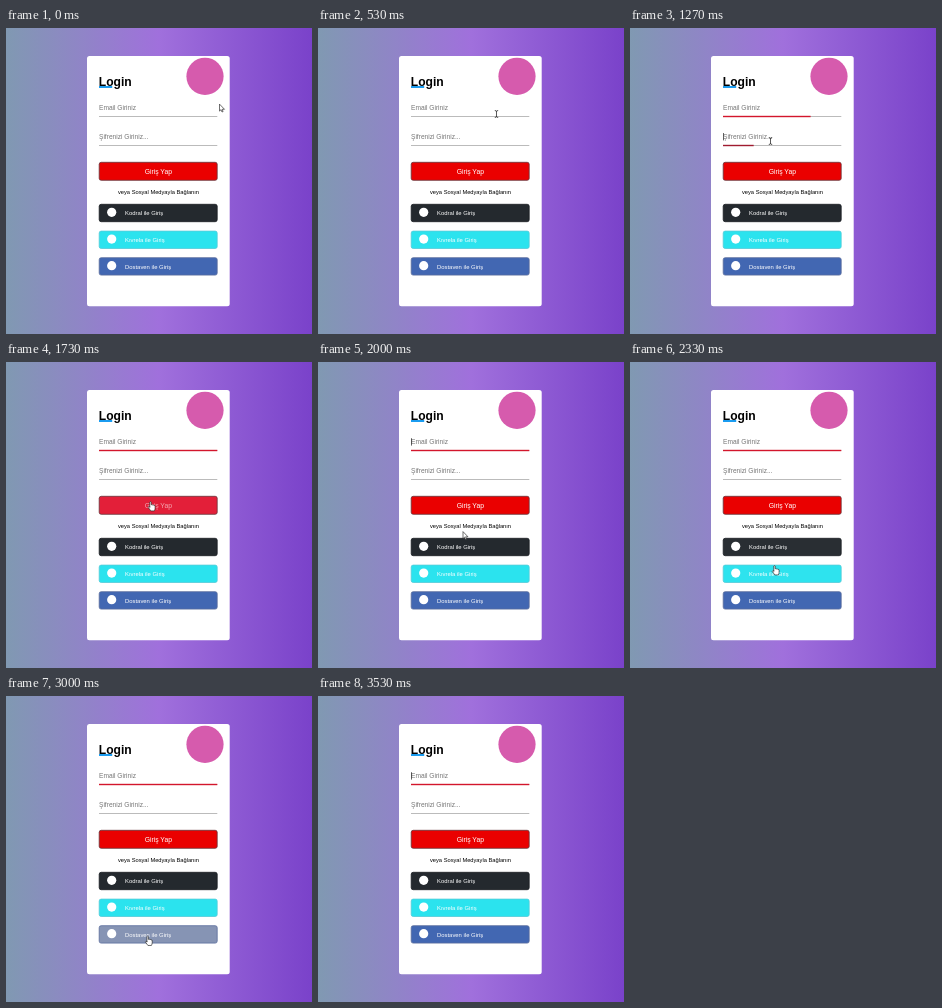
An HTML page that plays this animation: 306x306 px, repeating every 3.59 s.

```html
<!DOCTYPE html>
<html lang="tr">
<head>
<meta charset="utf-8">
<title>Login</title>
<style>
  html, body { margin: 0; width: 100%; height: 100%; overflow: hidden; }
  svg { display: block; width: 100%; height: 100%; }
  text { font-family: "Liberation Sans", Arial, sans-serif; }
  .placeholder { font-size: 6.6px; fill: #777; }
  .social { font-size: 5.9px; fill: #fff; }
</style>
</head>
<body>
<svg viewBox="0 0 306 306">
  <defs>
    <linearGradient id="sky">
      <stop offset="0" stop-color="#8099b2"/>
      <stop offset=".5" stop-color="#a070dc"/>
      <stop offset="1" stop-color="#7a42ca"/>
    </linearGradient>
  </defs>
  <rect width="306" height="306" fill="url(#sky)"/>
  <rect x="81" y="28" width="142.7" height="250.3" rx="2.5" fill="#fff"/>
  <circle cx="199" cy="48.3" r="18.6" fill="#d65bad"/>

  <rect x="93" y="58" width="13.2" height="2" fill="#1b9cf0"/>
  <text x="92.8" y="58" font-size="12.1" font-weight="bold">Login</text>

  <text class="placeholder" x="93" y="82.2">Email Giriniz</text>
  <text class="placeholder" x="93" y="111">Şifrenizi Giriniz...</text>
  <path d="M93 88.5h118.3M93 117.5h118.3" stroke="#aaa" stroke-width=".8"/>
  <rect id="emailLine" x="93" y="87.8" height="1.4" fill="#d3162c"/>
  <rect id="passwordLine" x="93" y="116.8" height="1.4" fill="#a01c30"/>
  <rect id="caret" x="93" width=".7" height="7.4" fill="#222"/>

  <g id="buttons"></g>
  <text x="152.5" y="166.3" font-size="5.72" text-anchor="middle">veya Sosyal Medyayla Bağlanın</text>

  <g id="cursor" stroke-linejoin="round" stroke-linecap="round">
    <path id="arrow" d="M0 0v6.6l1.5-1.4 1 2.3 1.1-.5-1-2.2h2z" fill="#fff" stroke="#222" stroke-width=".65"/>
    <path id="beam" d="M-1.3-3.4q1.3 0 1.3.7 0-.7 1.3-.7M0-2.7v5.4M-1.3 3.4q1.3 0 1.3-.7 0 .7 1.3.7" fill="none" stroke="#222" stroke-width=".75"/>
    <path id="hand" d="M-.7 5.4V.5q.7-1 1.4 0v2.8q1-.6 1.4.2 1-.4 1.3.4 1.1-.3 1.2.7v2.2q0 1-.8 2.6H.3L-2.3 5.8q.3-1.2 1.6-.4z" fill="#fff" stroke="#222" stroke-width=".65"/>
  </g>
</svg>
<script>
const LOOP = 3590, FPS = 15, LINE = 118.3, FOCUS_TIME = 260, HOVER_TIME = 120;
const CLICK_EMAIL = 720, CLICK_PASSWORD = 1180, CLICK_SUBMIT = 1460, CURSOR_GONE = 3470;
const el = id => document.getElementById(id);

// time, x, y of the pointer's hot spot
const path = [
  [330, 213.5, 76.5], [530, 178.5, 86], [720, 172, 85], [1000, 172, 85],
  [1180, 140.5, 112.8], [1275, 140.5, 113], [1460, 144.5, 139.5], [1800, 144.5, 139.5],
  [2000, 145, 170], [2140, 145, 185], [2330, 144.5, 203.5], [2500, 144, 214],
  [2580, 143, 231], [2730, 141.5, 233], [2950, 141.5, 238], [3450, 146, 312]
];

const buttons = [
  { y: 134, h: 18.6, color: [234, 0, 0], hover: [227, 31, 57], border: "#65343a", from: 1410, to: 1880 },
  { y: 176, h: 18, label: "Kodral", color: [36, 41, 46], hover: [75, 80, 87], border: "#1a1d22", from: 2060, to: 2240 },
  { y: 202.8, h: 18, label: "Kıvrela", color: [43, 227, 238], hover: [130, 215, 224], border: "#55cbd8", from: 2320, to: 2530 },
  { y: 229.4, h: 18, label: "Dostaven", color: [66, 103, 178], hover: [134, 148, 180], border: "#5a6d9c", from: 2560, to: 3030 }
];

el("buttons").innerHTML = buttons.map(({ y, h, label, border }) => `
  <g><rect x="93.2" y="${y + .3}" width="118" height="${h - .6}" rx="2" stroke="${border}" stroke-width=".8"/>
  ${label
    ? `<circle cx="105.7" cy="${y + 8.3}" r="4.6" fill="#fff"/>
       <text class="social" x="119" y="${y + 11.2}">${label} ile Giriş</text>`
    : `<text x="152.3" y="${y + 11.7}" font-size="6.8" text-anchor="middle" fill="#fff">Giriş Yap</text>`}
  </g>`).join("");
buttons.forEach((button, i) => button.node = el("buttons").children[i]);

const clamp = x => Math.max(0, Math.min(1, x));
const ease = x => (x = clamp(x), x * x * (3 - 2 * x));
const ramp = (t, start, duration) => ease((t - start) / duration);
const mix = (a, b, k) => a + (b - a) * k;

function pointerAt(t) {
  const next = path.findIndex(point => point[0] > t);
  if (next === 0) return path[0].slice(1);
  if (next < 0) return path.at(-1).slice(1);
  const [t0, x0, y0] = path[next - 1], [t1, x1, y1] = path[next];
  const k = ease((t - t0) / (t1 - t0));
  return [mix(x0, x1, k), mix(y0, y1, k)];
}

function pointerShape(x, y) {
  if (x > 211.3) return "arrow";
  if (y > 72 && y < 89 || y > 101 && y < 118) return "beam";
  return buttons.some(b => y >= b.y && y <= b.y + b.h) ? "hand" : "arrow";
}

function draw(t) {
  const focus = time => ramp(t, time, FOCUS_TIME);
  const password = focus(CLICK_PASSWORD) - focus(CLICK_SUBMIT);
  el("emailLine").setAttribute("width", LINE * (focus(CLICK_EMAIL) - password));
  el("passwordLine").setAttribute("width", LINE * password);

  const inPassword = t >= CLICK_PASSWORD && t < CLICK_SUBMIT;
  const blinkOn = t >= CLICK_EMAIL && (t - 150) % 800 < 400;
  el("caret").setAttribute("y", inPassword ? 105 : 76.2);
  el("caret").setAttribute("visibility", blinkOn ? "visible" : "hidden");

  for (const { node, color, hover, from, to, label } of buttons) {
    const k = ramp(t, from, HOVER_TIME) - ramp(t, to, HOVER_TIME);
    node.querySelector("rect").setAttribute("fill", `rgb(${color.map((c, i) => Math.round(mix(c, hover[i], k)))})`);
    if (!label) node.querySelector("text").setAttribute("opacity", 1 - .4 * k);
  }

  const [x, y] = pointerAt(t), shape = pointerShape(x, y);
  el("cursor").setAttribute("transform", `translate(${x} ${y})`);
  for (const id of ["arrow", "beam", "hand"])
    el(id).setAttribute("visibility", id === shape && t < CURSOR_GONE ? "visible" : "hidden");
}

function tick() {
  const t = performance.now() % LOOP;
  draw(Math.floor((t + 5) * FPS / 1000) * 1000 / FPS);
  requestAnimationFrame(tick);
}
tick();
</script>
</body>
</html>
```
